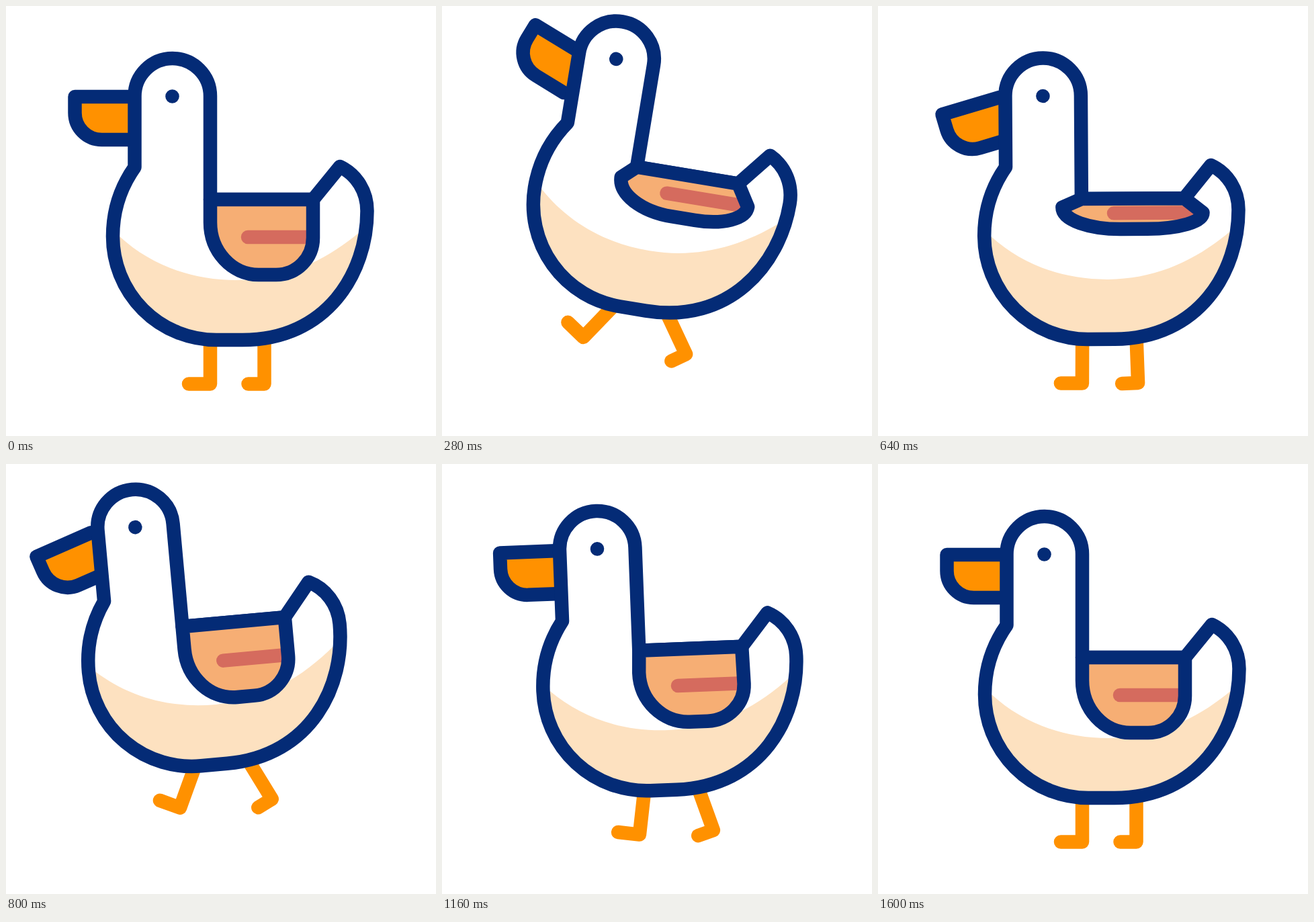
Animation, 640 px wide and 640 px high, one loop 2 s. Source, as an HTML page:

```html
<!DOCTYPE html>
<html lang="en">
<head>
<meta charset="utf-8">
<title>Duck</title>
<style>
  html, body { margin: 0; width: 100%; height: 100%; overflow: hidden; background: #fff; }
  svg { display: block; width: 100vw; height: 100vh; }

  path { fill: none; stroke-width: 20.5; stroke-linecap: round; stroke-linejoin: round; }
  .line { stroke: #042b76; }
  .leg { stroke: #ff9100; }
  .beak { fill: #ff9100; }
  .skin { fill: #fff; }
  .belly { fill: #fde1c0; }
  .wing { fill: #f6ae74; }
  .stripe { stroke: #d56b5e; stroke-linecap: round; }
  .eye { fill: #042b76; }

  .duck, .beak, .leg, .wing, .stripe {
    animation: 2s cubic-bezier(.333, 0, .667, 1) infinite;
  }
  .duck { transform-origin: 340px 340px; animation-name: hop, tilt; }
  .beak { transform-origin: 191px 166px; animation-name: nod; }
  .left { transform-origin: 304px 497px; animation-name: step-left; }
  .right { transform-origin: 384.5px 497px; animation-name: step-right; }
  .wing { animation-name: flap; }
  .stripe { animation-name: slide; }

  @keyframes hop {
    0%, 30%, 31%, 62.5%, 100% { translate: 0 0; }
    17% { translate: -25px -47px; }
    45.25% { translate: -53px -71px; }
  }
  @keyframes tilt {
    0%, 30%, 65.5%, 100% { rotate: 0deg; }
    17% { rotate: 10.2deg; }
    45.25% { rotate: -7.1deg; }
  }
  @keyframes nod {
    0%, 57%, 100% { rotate: 0deg; }
    17% { rotate: 24deg; }
    34.5%, 46.5% { rotate: -18.5deg; }
  }
  @keyframes step-left {
    0%, 25.9%, 31%, 64%, 100% { rotate: 0deg; }
    17% { rotate: 37.5deg; }
    45.25% { rotate: 36deg; }
  }
  @keyframes step-right {
    0%, 29%, 30%, 70.5%, 100% { rotate: 0deg; }
    17% { rotate: -37.5deg; }
    45.25% { rotate: -36deg; }
  }
  @keyframes flap {
    0%, 20%, 40%, 60%, 80%, 100% {
      d: path("M304 288L304 322C304 365 336 400 376 400L402 400C433 400 457 375 457 345L457 288Z");
      animation-timing-function: cubic-bezier(.6, 0, .6, 1);
    }
    10%, 30%, 50%, 70% {
      d: path("M304 288L273.6 299C273.6 317 316 329 362 329L402 329C450 329 486.3 320 486.3 307.3L457 288Z");
      animation-timing-function: cubic-bezier(.55, 0, .4, 1);
    }
  }
  @keyframes slide {
    0%, 20%, 40%, 60%, 80%, 100% {
      d: path("M360 344L455 344");
      animation-timing-function: cubic-bezier(.6, 0, .6, 1);
    }
    10%, 30%, 50%, 70% {
      d: path("M351.5 307.3L474 307.3");
      animation-timing-function: cubic-bezier(.55, 0, .4, 1);
    }
  }
</style>
</head>
<body>
<svg viewBox="0 0 640 640">
  <defs>
    <path id="body" d="M304 288V134.3A56.25 56.25 0 0 0 191.5 134.3V240C171 269 159 304 159 343A154 154 0 0 0 313 497H352C478 497 537.5 397 537.5 305C537.5 276 522 251 497 239L457 288Z"/>
    <clipPath id="inside"><use href="#body"/></clipPath>
  </defs>
  <g class="duck">
    <path class="leg left" d="M304 497V562.5H272"/>
    <path class="leg right" d="M384.5 497V562.5H360.5"/>
    <path class="line beak" d="M191 135H102.5V159A40 40 0 0 0 142.5 199H191"/>
    <use class="skin" href="#body" style="fill:#fff"/>
    <path class="skin" d="M304 288V134.3A56.25 56.25 0 0 0 191.5 134.3V240C171 269 159 304 159 343A154 154 0 0 0 313 497H352C478 497 537.5 397 537.5 305C537.5 276 522 251 497 239L457 288Z"/>
    <path class="belly" clip-path="url(#inside)" d="M150 325L169 343C215 385 275 408 343 408C415 408 475 380 527 336L560 306V520H150Z"/>
    <use class="line" href="#body"/>
    <path class="wing" d="M304 288L304 322C304 365 336 400 376 400L402 400C433 400 457 375 457 345L457 288Z"/>
    <path class="stripe" d="M360 344L455 344"/>
    <use class="line" href="#wing-line"/>
    <path class="line wing" style="fill:none" d="M304 288L304 322C304 365 336 400 376 400L402 400C433 400 457 375 457 345L457 288Z"/>
    <circle class="eye" cx="247.5" cy="134.5" r="10.3"/>
  </g>
</svg>
</body>
</html>
```
